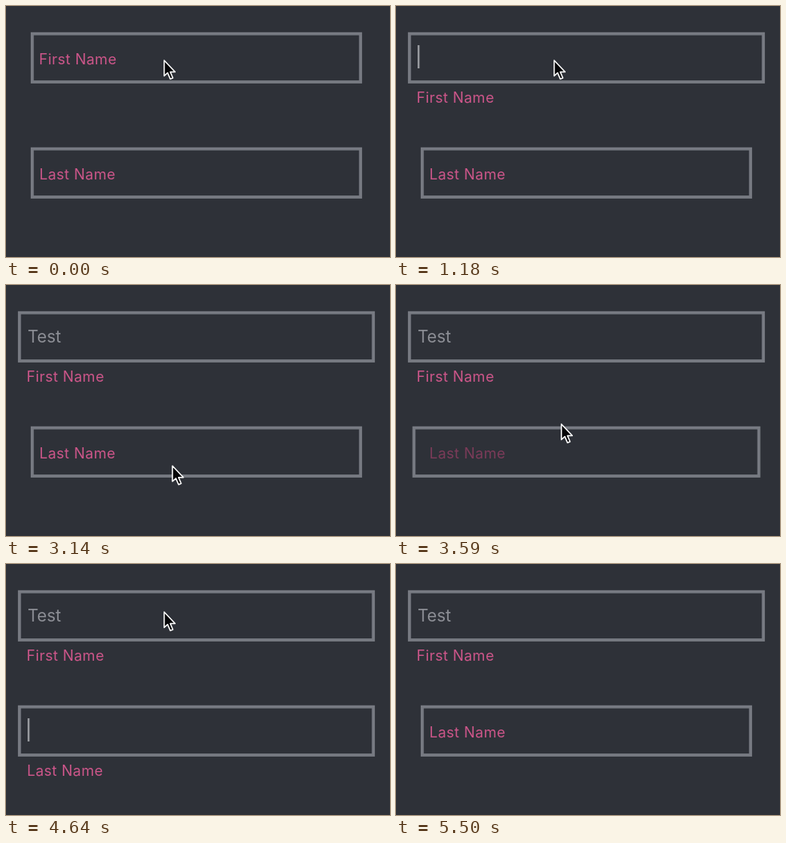
An HTML page for the animation above (5.55 s loop, 480 px wide and 314 px high).

```html
<!DOCTYPE html>
<html lang="en">
<head>
<meta charset="utf-8">
<title>Floating label form</title>
<style>
  html, body { margin: 0; width: 100%; height: 100%; overflow: hidden; background: #2e3138; }
  svg { display: block; width: 480px; height: 314px; }
  text { font-family: Inter, Roboto, sans-serif; }
  .box { fill: none; stroke: #777a82; stroke-width: 3.8; }
  .label { font-size: 18.2px; letter-spacing: .4px; text-anchor: middle; }
  .caret { fill: #96989d; }
  #typed { font-size: 21px; letter-spacing: -.1px; fill: #8c8e95; }
  #cursor { fill: #060608; stroke: #fff; stroke-width: 1.5; stroke-linejoin: round; }
</style>
</head>
<body>
<svg viewBox="0 0 480 314">
  <g>
    <rect class="box" y="34.7" height="60.3"/>
    <text class="label" y="6.7">First Name</text>
    <rect class="caret" x="27" y="49" width="2.4" height="29"/>
  </g>
  <g transform="translate(0 144)">
    <rect class="box" y="34.7" height="60.3"/>
    <text class="label" y="6.7">Last Name</text>
    <rect class="caret" x="27" y="49" width="2.4" height="29"/>
  </g>
  <text id="typed" x="27" y="72"></text>
  <path id="cursor" d="M.7 0V19.5L5 15.6L8.4 23.4L11.6 22L8.3 14.4H14.4Z"/>
</svg>
<script>
const LOOP = 5550, GROW = 150, FADE = 230, POP = 340, POP_TIME = 200;
const PINK = [205, 86, 138];
const FOCUS_1 = 640, FOCUS_2 = 3530, BLUR_2 = 4810, CURSOR_GONE = 5310;
const keyTimes = [1500, 1590, 2000, 2180];

// Pointer moves, each smoothed from rest to rest
const moves = [
  { from: 2500, to: 2740, x: 209, y: 290 },
  { from: 2800, to: 3440, x: 206, y: 174 },
  { from: 3880, to: 4360, x: 197, y: 60 },
  { from: 4830, to: CURSOR_GONE, x: 196, y: 320 }
];

const fields = [...document.querySelectorAll("g")].map((g, i) => ({
  box: g.children[0], label: g.children[1], caret: g.children[2], center: 89.9 - i / 2
}));
const typed = document.getElementById("typed");
const cursor = document.getElementById("cursor");

const clamp = v => Math.max(0, Math.min(1, v));
const mix = (a, b, p) => a + (b - a) * p;
const easeOut = u => 1 - (1 - clamp(u)) ** 2;
const smooth = u => (u = clamp(u)) * u * (3 - 2 * u);
const within = (t, ...spans) => spans.some(([a, b]) => t >= a && t < b);
const show = (el, on) => el.setAttribute("visibility", on ? "visible" : "hidden");

// age: time since the last toggle; open: the state it leads to
function drawField({ box, label, center }, age, open) {
  const grown = easeOut(age / GROW);
  const inset = mix(32.8, 16.8, open ? grown : 1 - grown);
  box.setAttribute("x", inset);
  box.setAttribute("width", 476 - 2 * inset);

  // The old label fades in place, then the new one pops out of it
  const popped = easeOut((age - POP) / POP_TIME);
  const waiting = age < POP;
  const ink = waiting ? 1 - clamp(age / FADE) : 1;
  const scale = waiting ? 1 : popped;
  const place = open === waiting ? 1 - scale : scale;
  const shift = waiting ? (open ? 0 : 1) : place;
  const x = center - 15.5 * shift, y = 66.5 + 48 * shift;
  label.setAttribute("transform", `translate(${x} ${y}) scale(${scale})`);
  label.setAttribute("fill", `rgba(${PINK.map(c => Math.round(c * ink))},${ink})`);
}

function drawCursor(t) {
  let x = 197, y = 68;
  for (const m of moves) {
    const p = smooth((t - m.from) / (m.to - m.from));
    x = mix(x, m.x, p);
    y = mix(y, m.y, p);
  }
  cursor.setAttribute("transform", `translate(${x} ${y})`);
  show(cursor, t < CURSOR_GONE);
}

function draw(now) {
  const t = now % LOOP;
  const [first, last] = fields;

  drawField(first, t < FOCUS_1 ? Infinity : t - FOCUS_1, t >= FOCUS_1);
  if (t < FOCUS_2) drawField(last, Infinity, false);
  else if (t < BLUR_2) drawField(last, t - FOCUS_2, true);
  else drawField(last, t - BLUR_2, false);

  typed.textContent = "Test".slice(0, keyTimes.filter(k => t >= k).length);
  const textWidth = typed.textContent ? typed.getComputedTextLength() : 0;
  first.caret.setAttribute("x", 27 + textWidth);
  show(first.caret, within(t, [1110, 2680], [3180, FOCUS_2], [BLUR_2, CURSOR_GONE]));
  show(last.caret, within(t, [4010, BLUR_2]));

  drawCursor(t);
}

const start = performance.now();
function tick() {
  draw(performance.now() - start);
  requestAnimationFrame(tick);
}
tick();
</script>
</body>
</html>
```
